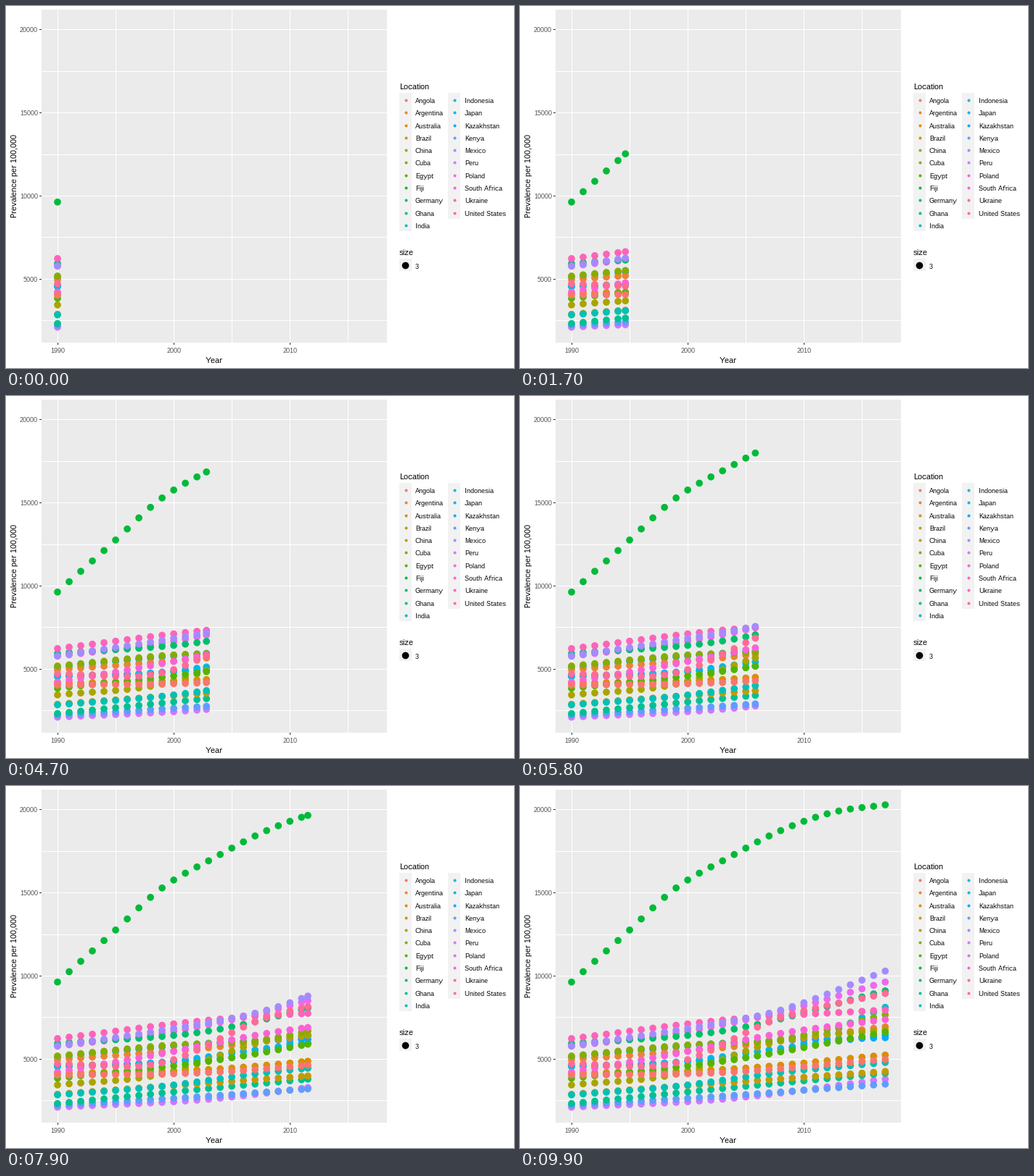
Write a matplotlib script that moves like this. It is 700 px wide and 500 px high and loops after 10000 ms.

```python
import numpy as np
import matplotlib.pyplot as plt
from matplotlib.animation import FuncAnimation
from matplotlib.patches import Rectangle

W, H, DPI = 700, 500, 100
PX = 72 / DPI  # one pixel in points
FRAMES, SPAN = 100, 27
LEFT, TOP, RIGHT, BOTTOM = 49, 5, 525, 465
DOT = 9.7
plt.rcParams.update({"font.family": "Liberation Sans",
                     "text.hinting": "native", "text.hinting_factor": 1})

# A few key values, evenly spaced over the time span, listed back to front
TRENDS = {
    "Indonesia": (4550, 4800, 5500, 8120),
    "Japan": (4600, 4820, 5650, 6450),
    "Peru": (2110, 2620, 3800),
    "Poland": (5780, 6560, 7850, 9640),
    "Kenya": (2240, 2800, 3500),
    "Ghana": (2330, 3270, 4150),
    "Kazakhstan": (5130, 5980, 6290),
    "Argentina": (4970, 5720, 6950),
    "Brazil": (2890, 3590, 4260),
    "Australia": (4150, 4400, 5250),
    "China": (3450, 4100, 6100, 6750),
    "India": (2850, 3370, 4200, 4800),
    "Egypt": (3850, 4920, 6620),
    "Germany": (5940, 6750, 9110),
    "Cuba": (5190, 5810, 6200, 7670),
    "South Africa": (4220, 5330, 6550, 7380),
    "Ukraine": (6240, 7380, 7960),
    "United States": (4720, 4780, 7500, 8950),
    "Angola": (4040, 4210, 4980),
    "Mexico": (5800, 6740, 7950, 10300),
    "Fiji": (9640, 12450, 15300, 17120, 18750, 19850, 20300),
}
NAMES = sorted(TRENDS)


def hue_color(i, n):
    """Evenly spaced polar LUV hue with chroma 100 and lightness 65."""
    h = np.radians(15 + 360 * i / n)
    u = 100 * np.cos(h) / (13 * 65) + 0.1978
    v = 100 * np.sin(h) / (13 * 65) + 0.4683
    y = ((65 + 16) / 116) ** 3
    x = 9 * y * u / (4 * v)
    z = -x / 3 - 5 * y + 3 * y / v
    lin = np.array([[3.240479, -1.53715, -0.498535],
                    [-0.969256, 1.875992, 0.041556],
                    [0.055648, -0.204043, 1.057311]]) @ (x, y, z)
    lin = np.clip(lin, 0, 1)
    return np.where(lin > 0.00304, 1.055 * lin ** (1 / 2.4) - 0.055, 12.92 * lin)


def smooth(t, values):
    """Cubic Hermite curve through evenly spaced values."""
    p = np.array(values, float)
    m = np.gradient(p)
    u = t / SPAN * (len(p) - 1)
    i = np.minimum(u.astype(int), len(p) - 2)
    s = u - i
    return ((2 * s**3 - 3 * s**2 + 1) * p[i] + (s**3 - 2 * s**2 + s) * m[i]
            + (3 * s**2 - 2 * s**3) * p[i + 1] + (s**3 - s**2) * m[i + 1])


def x_px(t):
    return 71 + 16.01 * t


def y_px(value):
    return 377.3 - 0.02296 * (value - 5000)


fig = plt.figure(figsize=(W / DPI, H / DPI), dpi=DPI, facecolor="white")
ax = fig.add_axes([0, 0, 1, 1])
ax.set_xlim(0, W)
ax.set_ylim(H, 0)
ax.axis("off")


def box(x, y, w, h, color):
    ax.add_patch(Rectangle((x, y), w, h, color=color, lw=0, zorder=1))


def label(x, y, text, size, color="black", **kw):
    ax.text(x, y, text, fontsize=size * PX, color=color, **kw)


def dots(x, y, color, diameter):
    return ax.scatter(x, y, s=(diameter * PX) ** 2, c=color, linewidths=0, zorder=3)


def draw_panel():
    box(LEFT, TOP, RIGHT - LEFT, BOTTOM - TOP, "#EBEBEB")
    for t in range(0, 26, 5):
        x = int(x_px(t))
        box(x, TOP, 1, BOTTOM - TOP, "white")
        if t % 10 == 0:
            box(x, BOTTOM, 1, 3, "#333333")
            label(x + 0.5, 479, str(1990 + t), 9, "#4D4D4D", ha="center")
    for value in range(2500, 20001, 2500):
        y = int(y_px(value))
        box(LEFT, y, RIGHT - LEFT, 1, "white")
        if value % 5000 == 0:
            box(LEFT - 3, y, 3, 1, "#333333")
            label(44, y + 4, str(value), 9, "#4D4D4D", ha="right")
    label(287, 493, "Year", 11, ha="center")
    label(12, 235, "Prevalence per 100,000", 11, rotation=90,
          ha="center", va="center")


def draw_legend():
    rows, step = 11, 17.28
    label(542, 115, "Location", 11)
    for x, n in ((542, rows), (609, len(NAMES) - rows)):
        box(x, 120, 17, round(n * step) + 1, "#F2F2F2")
    for i, name in enumerate(NAMES):
        col, row = divmod(i, rows)
        y = 130 + row * step
        dots([550.5 + 67 * col], [y], [COLORS[name]], 4)
        label(564 + 68 * col, round(y + 4), name, 9)
    label(542, 344, "size", 11)
    box(542, 349, 17, 17, "#F2F2F2")
    dots([550.3], [358], "black", DOT)
    label(564, 363, "3", 9)


COLORS = {name: hue_color(i, len(NAMES)) for i, name in enumerate(NAMES)}
YEARS = np.arange(SPAN + 1)
YEARLY = [smooth(YEARS, values) for values in TRENDS.values()]
ROW_COLORS = np.array([COLORS[name] for name in TRENDS])

draw_panel()
draw_legend()
trail = dots([], [], None, DOT)


def update(frame):
    now = SPAN * frame / (FRAMES - 1)
    times = np.arange(np.ceil(now))  # whole years already passed
    times = np.append(times, now)
    values = np.array([np.interp(times, YEARS, v) for v in YEARLY]).T
    xs = np.repeat(x_px(times), len(YEARLY))
    trail.set_offsets(np.column_stack([xs, y_px(values).ravel()]))
    trail.set_facecolors(np.tile(ROW_COLORS, (len(times), 1)))
    return [trail]


anim = FuncAnimation(fig, update, frames=FRAMES, interval=100,
                     init_func=lambda: update(0), repeat=True, repeat_delay=0)
plt.show()
```
